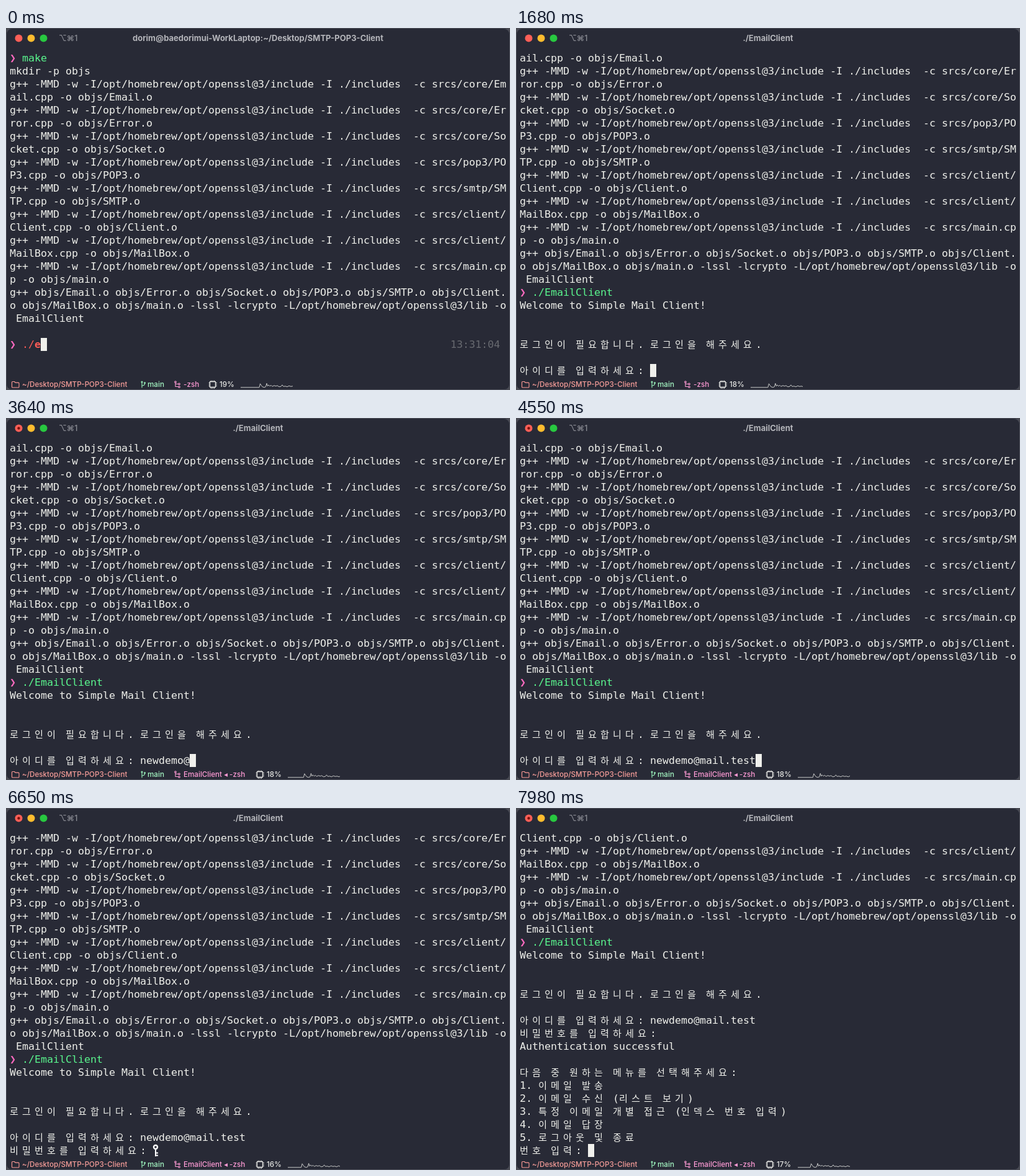
An HTML page for the animation above (8000 ms loop, 812 by 584 pixels).

```html
<!DOCTYPE html>
<html lang="ko">
<head>
<meta charset="utf-8">
<title>Terminal</title>
<style>
  html, body { margin: 0; width: 100%; height: 100%; overflow: hidden; background: #4a4b53; }
  #win { position: absolute; left: 0; top: 0; width: 812px; height: 584px; overflow: hidden;
    box-sizing: border-box; background: #282a36; border-radius: 10px 10px 9px 9px;
    box-shadow: inset 0 0 0 1px #50525c; }
  #rows, #clock { position: absolute; white-space: pre; color: #eff0eb;
    font: 16.61px/21px "DejaVu Sans Mono", monospace; }
  #rows { left: 6px; top: 38px; }
  #rows div { height: 21px; }
  #clock { left: 716px; top: 500px; color: #686a70; }
  .k { display: inline-block; width: 20px; line-height: 0;
    font-family: "Noto Sans CJK KR", "Noto Sans CJK", sans-serif; font-size: 15.2px; font-style: normal; }
  .arrow { display: inline-block; width: 10px; line-height: 0; color: #ff6ac1; font-style: normal; }
  .ok { color: #5af78e; }
  .bad { color: #ff5c57; }
  svg { position: absolute; left: 0; top: 0; }
  .bar { font: 500 11.65px Inter, sans-serif; }
  .icon { fill: none; stroke-width: 1.1; stroke-linejoin: round; stroke-linecap: round; }
</style>
</head>
<body>
<div id="win">
  <div id="rows"></div>
  <div id="clock">13:31:04</div>
  <svg width="812" height="584" viewBox="0 0 812 584">
    <circle cx="20.5" cy="16.5" r="6" fill="#ff5f57"/>
    <circle cx="40.5" cy="16.5" r="6" fill="#febc2e"/>
    <circle cx="60.5" cy="16.5" r="6" fill="#28c840"/>
    <circle id="dot" cx="20.5" cy="16.5" r="2.2" fill="#7d120d"/>
    <text x="85" y="21" fill="#8b8c94" style="font:500 12.5px Inter, 'DejaVu Sans', sans-serif">⌥⌘1</text>
    <text id="title" x="406" y="21" text-anchor="middle" fill="#b4b5ba" style="font:700 13px Inter, sans-serif"></text>

    <rect id="cursor" width="10" height="21" fill="#f0f0ec"/>
    <g id="key" fill="none" stroke="#fff">
      <circle cx="5" cy="5" r="3" stroke-width="2.4"/>
      <path d="M5 8V20M5 14.5H9M5 18.5H9" stroke-width="2"/>
    </g>

    <g class="bar">
      <path class="icon" stroke="#ff9c98" d="M9.5 579V571.5q0-1 1-1h3l1.5 1.6h5q1 0 1 1V579q0 1-1 1h-9.500q-1 0-1-1z"/>
      <text x="26" y="579.3" fill="#f59c98">~/Desktop/SMTP-POP3-Client</text>
      <g class="icon" stroke="#9cf5bd">
        <path d="M219 572V580M219 577q4.500 0 4.500-3.500"/>
        <circle cx="219" cy="571" r="1"/><circle cx="223.5" cy="572.500" r="1"/>
      </g>
      <text x="228" y="579.3" fill="#a4f7c3">main</text>
      <g class="icon" stroke="#ff9bd5">
        <path d="M273 572V578.500H277.500M273 574.300H277.500"/>
        <circle cx="273" cy="571" r="1.300"/><circle cx="279" cy="574.300" r="1.300"/><circle cx="279" cy="579" r="1.300"/>
      </g>
      <text id="job" x="286" y="579.3" fill="#ff9bd5" xml:space="preserve"></text>
      <g id="cpu">
        <g class="icon" stroke="#e6e7e4">
          <rect x="328.500" y="570.500" width="9" height="9" stroke-width="1.300"/>
          <path d="M330.500 569V570M333 569V570M335.500 569V570M330.500 580.500V581.500M333 580.500V581.500M335.500 580.500V581.500M327 572.500H328M327 575H328M327 577.500H328M338.500 572.500H339.500M338.500 575H339.500M338.500 577.500H339.500"/>
        </g>
        <text id="load" x="344" y="579.3" fill="#e6e7e4"></text>
        <clipPath id="graph"><rect x="378" y="566" width="84" height="17"/></clipPath>
        <g clip-path="url(#graph)">
          <polyline id="spark" fill="none" stroke="#c9cac9" stroke-width="1"/>
        </g>
      </g>
    </g>
  </svg>
</div>
<script>
const LOOP = 8000, COLS = 80, ROWS = 25;
const $ = id => document.getElementById(id);

const TAB = 210, ENTER = 1190, OUTPUT = 1470, JOB = 1820,
      LOGIN = 4620, PASSWORD = 6720, MENU = 6930;
const address = "newdemo@mail.test";
const keyTimes = [2450, 2590, 2730, 2870, 3010, 3150, 3290, 3570, 3780,
                  3850, 3920, 4060, 4130, 4200, 4340, 4410, 4480];
const loads = [[0, 19], [560, 16], [1400, 18], [5880, 16], [7490, 17]];

const ssl = "/opt/homebrew/opt/openssl@3";
const sources = ["core/Email", "core/Error", "core/Socket", "pop3/POP3",
                 "smtp/SMTP", "client/Client", "client/MailBox", "main"];
const objects = sources.map(s => `objs/${s.split("/").pop()}.o`);
const wrap = s => s.match(new RegExp(`.{1,${COLS}}`, "g"));
const prompt = (text, kind) => `<i class="arrow">❯</i> <span class="${kind}">${text}</span>`;

const build = [
  prompt("make", "ok"),
  "mkdir -p objs",
  ...sources.flatMap((s, i) => wrap(
    `g++ -MMD -w -I${ssl}/include -I ./includes  -c srcs/${s}.cpp -o ${objects[i]}`)),
  ...wrap(`g++ ${objects.join(" ")} -lssl -lcrypto -L${ssl}/lib -o EmailClient`)
];
const menu = [
  "Authentication successful", "",
  "다음 중 원하는 메뉴를 선택해주세요:",
  "1. 이메일 발송",
  "2. 이메일 수신 (리스트 보기)",
  "3. 특정 이메일 개별 접근 (인덱스 번호 입력)",
  "4. 이메일 답장",
  "5. 로그아웃 및 종료",
  "번호 입력: "
];

function screen(t) {
  const run = prompt("./EmailClient", "ok");
  if (t < TAB) return [...build, "", prompt("./<b>e</b>", "bad")];
  if (t < ENTER) return [...build, "", run];
  const out = [...build, run];
  if (t < OUTPUT) return [...out, ""];
  const typed = address.slice(0, keyTimes.filter(k => k <= t).length);
  out.push("Welcome to Simple Mail Client!", "", "",
    "로그인이 필요합니다. 로그인을 해주세요.", "",
    "아이디를 입력하세요: " + typed);
  if (t >= LOGIN) out.push("비밀번호를 입력하세요: ");
  if (t >= MENU) out.push(...menu);
  else if (t >= PASSWORD) out.push("");
  return out;
}

// Hangul takes two terminal cells
const hangul = /[가-힣]/g;
const cells = s => s.replace(/<[^>]*>/g, "").replace(hangul, "  ").length;
const place = (el, x, y) => el.setAttribute("transform", `translate(${x} ${y})`);
const show = (el, on) => { el.style.display = on ? "" : "none"; };

let last = "";
function drawText(t) {
  const lines = screen(t).slice(-ROWS);
  const html = lines.map(s => `<div>${s.replace(hangul, '<i class="k">$&</i>')}</div>`).join("");
  if (html !== last) $("rows").innerHTML = last = html;
  const row = lines.length - 1;
  const hidden = t >= LOGIN && t < PASSWORD;
  for (const id of ["cursor", "key"])
    place($(id), 6 + 10 * cells(lines[row]), 38 + 21 * row);
  show($("cursor"), !hidden);
  show($("key"), hidden);
}

const heights = [[-5, 0], [30, 0], [31.5, 6], [33.5, 3], [35, 1], [38, 0], [40.5, 1],
  [42, 6.5], [43.5, 2], [45, 4], [47, 2], [49, 3.5], [51, 1.5], [54, 3], [57, 2], [59, 3],
  [62, 1], [65, 1.5], [67, 4], [69, 1.5], [72, 2], [75, 1], [78, 2.5], [81, 1.5], [84, 2],
  [87, 1], [90, 2.5], [93, 1.5], [98, 2]];
$("spark").setAttribute("points", heights.map(([x, h]) => `${378 + x},${579.8 - h}`).join(" "));

function frame() {
  const t = performance.now() % LOOP;
  drawText(t);
  show($("clock"), t < ENTER);
  show($("dot"), t >= JOB);
  $("title").textContent = t < ENTER
    ? "dorim@baedorimui-WorkLaptop:~/Desktop/SMTP-POP3-Client" : "./EmailClient";
  $("job").textContent = t < JOB ? "-zsh" : "EmailClient ◂ -zsh";
  place($("cpu"), t < JOB ? 0 : 76, 0);
  $("load").textContent = loads.filter(l => l[0] <= t).pop()[1] + "%";
  place($("spark"), -t * 0.00125, 0);
  requestAnimationFrame(frame);
}
frame();
</script>
</body>
</html>
```
